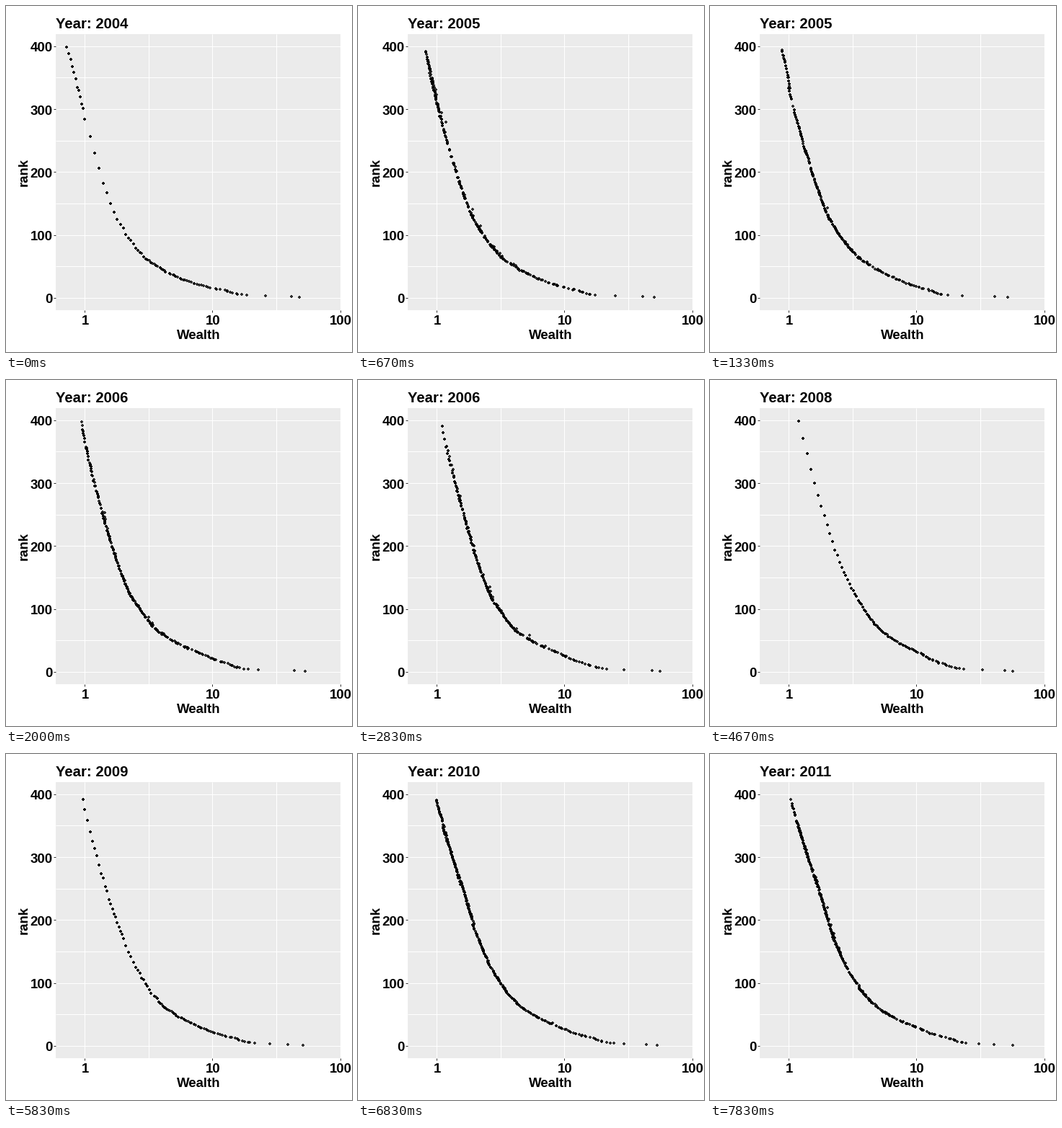
A matplotlib script that plays this animation: 480 px wide and 480 px high, repeating every 8000 ms.

```python
import numpy as np
import matplotlib.pyplot as plt
from matplotlib.animation import FuncAnimation
from matplotlib.patches import Rectangle

SIZE, DPI = 480, 100
PT = 72 / DPI  # points per pixel
LOOP_MS, TICK_MS = 8000, 40
STEPS_PER_SECOND, STEPS_PER_YEAR = 6, 7
START, PEOPLE = 2004, 400
LEFT, RIGHT, TOP, BOTTOM = 69, 464, 39, 422
FONT = dict(family="Liberation Sans", weight="bold", color="black")

places = np.arange(1, PEOPLE + 1)

# Wealth at a few ranks; a power law joins neighbouring points.
KEY_RANKS = (1, 2, 4, 12, 30, 65, 130, 250, 400)
KEY_WEALTH = {
    2004: (48, 41, 18.5, 12.3, 5.85, 2.95, 1.8, 1.19, 0.745),
    2005: (51, 40, 16.5, 12.6, 6.9, 3.45, 2.04, 1.32, 0.88),
    2006: (53, 46, 18.3, 14.3, 8.6, 3.85, 2.32, 1.49, 1.0),
    2007: (59, 52, 26, 16.3, 9.8, 4.7, 2.95, 2.0, 1.29),
    2008: (57, 50, 23.5, 16.5, 10.8, 5.35, 3.22, 1.94, 1.27),
    2009: (50, 40, 21.5, 15, 8.1, 4.05, 2.5, 1.5, 0.97),
    2010: (54, 45, 24, 17, 9.4, 4.45, 2.65, 1.66, 1.0),
    2011: (59, 39, 25, 18.4, 10.1, 4.78, 2.86, 1.8, 1.05),
}


def to_x(log_wealth):
    return 109.2 + 177.2 * log_wealth


def to_y(rank):
    return 404.83 - 0.8726 * rank


def year_rows(year):
    """Log wealth and rank for every place; equal wealth shares the best rank."""
    rng = np.random.default_rng(year)
    wealth = np.exp(np.interp(np.log(places), np.log(KEY_RANKS),
                              np.log(KEY_WEALTH[year])))
    wealth = -np.sort(-wealth * np.exp(rng.normal(0, 0.015, PEOPLE)))
    low_step = 0.1 if year < 2009 else 0.05
    step = np.select([wealth < 1, wealth < 2], [0.025, low_step], 0.1)
    wealth = np.round(np.round(wealth / step) * step, 3)
    rank = np.searchsorted(-wealth, -wealth) + 1
    return np.array([np.log10(wealth), rank])


def next_places(year):
    """Which place each person takes in the following year."""
    rng = np.random.default_rng(year)
    return np.argsort(places * np.exp(rng.laplace(0, 0.15, PEOPLE)))


rows = [year_rows(y) for y in KEY_WEALTH]
moves = [next_places(y) for y in KEY_WEALTH]


def positions(step):
    k, part = divmod(step, STEPS_PER_YEAR)
    a, b = rows[k], rows[k + 1][:, moves[k]]
    return a + (b - a) * part / STEPS_PER_YEAR


fig = plt.figure(figsize=(SIZE / DPI, SIZE / DPI), dpi=DPI, facecolor="white")
ax = fig.add_axes([0, 0, 1, 1])
ax.set(xlim=(0, SIZE), ylim=(SIZE, 0))
ax.axis("off")


def line(xs, ys, color):
    ax.plot(xs, ys, color=color, lw=PT, solid_capstyle="butt")


def text(x, y, s, px=18.67, **kw):
    return ax.text(x, y, s, fontsize=px * PT, va="baseline", **FONT, **kw)


ax.add_patch(Rectangle((LEFT, TOP), RIGHT - LEFT, BOTTOM - TOP,
                       fc="#EBEBEB", lw=0, antialiased=False))
for rank in range(0, 401, 50):
    y = to_y(rank)
    line([LEFT, RIGHT], [y, y], "white")
    if rank % 100 == 0:
        line([LEFT - 3, LEFT], [y, y], "#333333")
        text(64.5, y + 7.5, str(rank), ha="right")
for half in range(5):
    x = to_x(half / 2)
    line([x, x], [TOP, BOTTOM], "white")
    if half % 2 == 0:
        line([x, x], [BOTTOM, BOTTOM + 3], "#333333")
        text(x + 0.3, 442, str(10 ** (half // 2)), ha="center")

text(267, 462, "Wealth", ha="center")
text(29.5, 230.5, "rank", ha="center", rotation=90, rotation_mode="anchor")
title = text(LEFT, 31, "", 20.3, ha="left")

# A crisp dot: a 4 x 4 pixel square without its corners.
quarter = np.array([(1, 2), (1, 1), (2, 1)])
turn = np.array([(0, 1), (-1, 0)])
shape = np.vstack([quarter @ np.linalg.matrix_power(turn, -n % 4) for n in range(4)])
dots, = ax.plot([], [], marker=np.vstack([shape, shape[:1]]), ls="",
                color="black", ms=4 * PT, mew=0, alpha=0.8)


def draw(tick):
    # A step begins inside the tick that reaches it.
    reached = tick * TICK_MS + 34
    step = reached * STEPS_PER_SECOND // 1000
    log_wealth, rank = positions(step)
    dots.set_data(to_x(log_wealth), to_y(rank))
    title.set_text(f"Year: {round(START + step / STEPS_PER_YEAR)}")
    return dots, title


anim = FuncAnimation(fig, draw, frames=LOOP_MS // TICK_MS, interval=TICK_MS,
                     repeat=True, repeat_delay=0)
plt.show()
```
